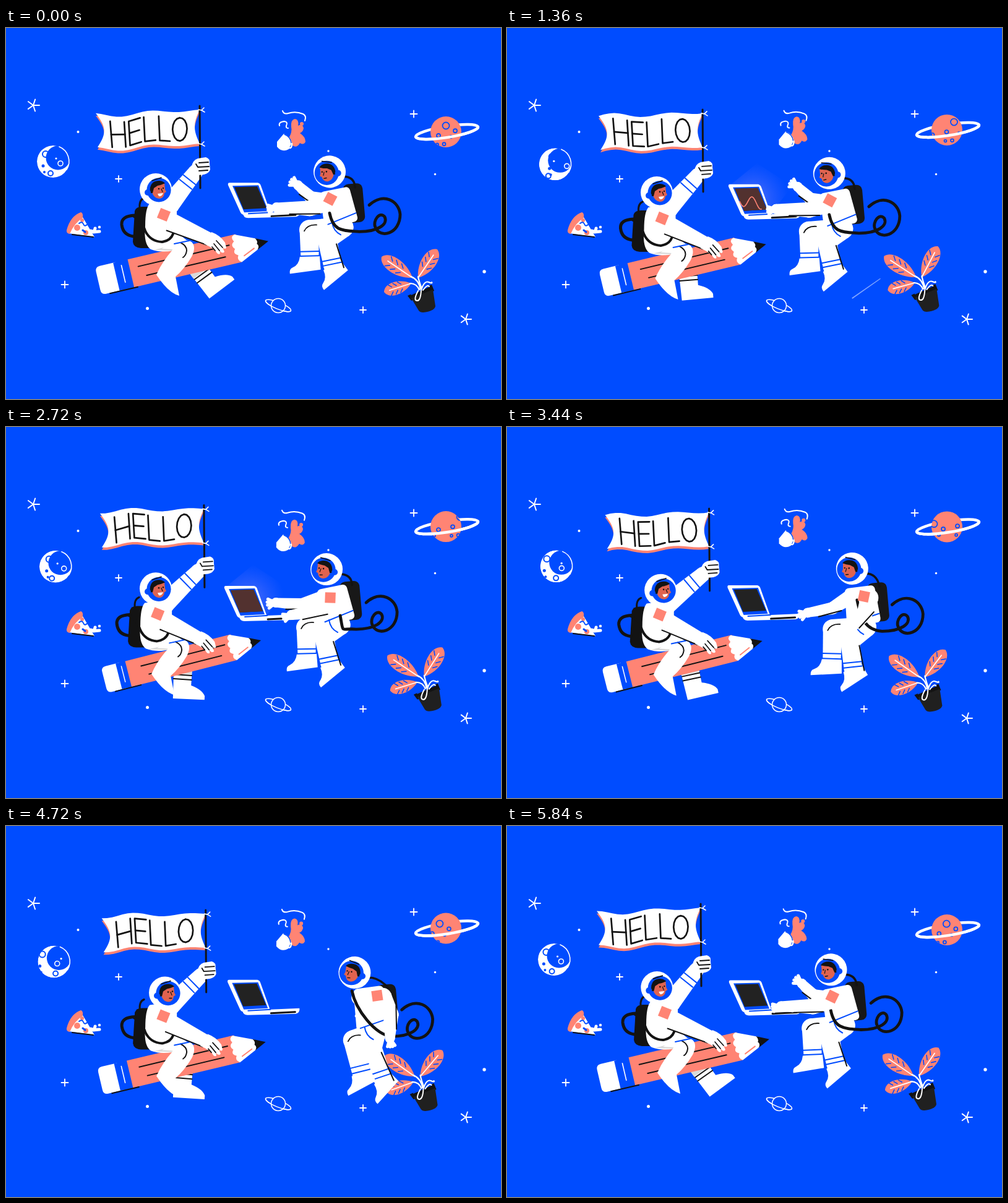
An HTML page that plays this animation: 800x600 px, repeating every 5920 ms.

```html
<!DOCTYPE html>
<html lang="en">
<head>
<meta charset="utf-8">
<title>Hello from space</title>
<style>
html, body { margin: 0; width: 100%; height: 100%; overflow: hidden; background: #004cff; }
svg { display: block; width: 100vw; height: 100vh; }
</style>
</head>
<body>
<svg viewBox="0 0 800 600">
  <defs>
    <radialGradient id="glow" gradientUnits="userSpaceOnUse" cx="398" cy="272" r="58">
      <stop offset="0" stop-color="#b79cf0" stop-opacity=".45"/>
      <stop offset="1" stop-color="#7f7cff" stop-opacity="0"/>
    </radialGradient>
    <clipPath id="globe"><circle r="25"/></clipPath>
    <clipPath id="lunar"><circle r="26"/></clipPath>
  </defs>
  <g id="scene"></g>
</svg>
<script>
const BLUE = '#004cff', CORAL = '#ff8474', SKIN = '#e0634f', INK = '#131313', WHITE = '#fff', GREY = '#d9d9d9';
const LOOP = 5920, STEP = 80, TAU = Math.PI * 2;
let now = 0;

// Timing rules: every part floats on whole cycles of the loop
const cos = (cycles, lag = 0) => Math.cos(TAU * cycles * (now / LOOP - lag));
const sin = cycles => Math.sin(TAU * cycles * now / LOOP);
const ease = (a, b) => {
  const k = Math.min(1, Math.max(0, (now - a) / (b - a)));
  return k * k * (3 - 2 * k);
};
const sway = () => (1 - cos(1)) / 2;
const bob = () => (1 - cos(2)) / 2;
const hover = () => 2 + 5 * cos(2, .135);

const add = (p, x, y) => [p[0] + x, p[1] + y];
const mix = (a, b, k) => a.map((v, i) => v + (b[i] - v) * k);
const angle = (a, b) => Math.atan2(b[1] - a[1], b[0] - a[0]);
const degrees = r => r * 360 / TAU;
function normal(a, b) {
  const t = angle(a, b);
  return [-Math.sin(t), Math.cos(t)];
}
const aside = (a, b, k, d) => {
  const [nx, ny] = normal(a, b);
  return add(mix(a, b, k), nx * d, ny * d);
};

const fill = (d, c) => `<path d="${d}" fill="${c}"/>`;
const line = (d, c = INK, w = 2) =>
  `<path d="${d}" fill="none" stroke="${c}" stroke-width="${w}" stroke-linecap="round" stroke-linejoin="round"/>`;
const dot = (x, y, r, c) => `<circle cx="${x}" cy="${y}" r="${r}" fill="${c}"/>`;
const ring = (x, y, r, c, w) => `<circle cx="${x}" cy="${y}" r="${r}" fill="none" stroke="${c}" stroke-width="${w}"/>`;
const group = ([x, y], rot, inner, sx = 1, sy = sx) =>
  `<g transform="translate(${x} ${y}) rotate(${rot}) scale(${sx} ${sy})">${inner}</g>`;
const fade = (k, inner) => `<g opacity="${k}">${inner}</g>`;
const limb = (a, b, wa, wb) =>
  fill(`M${aside(a, b, 0, wa / 2)}L${aside(a, b, 1, wb / 2)}L${aside(a, b, 1, -wb / 2)}L${aside(a, b, 0, -wa / 2)}Z`, WHITE)
  + dot(...a, wa / 2, WHITE) + dot(...b, wb / 2, WHITE);
const bands = (a, b, w, marks) =>
  marks.map(k => line(`M${aside(a, b, k, w / 2)}L${aside(a, b, k, -w / 2)}`, BLUE)).join('');
const patch = (p, rot) => group(p, rot, `<rect x="-8.5" y="-8.5" width="17" height="17" fill="${CORAL}"/>`);

function orbit(p, rx, ry, rot, w, body) {
  const back = `<ellipse rx="${rx}" ry="${ry}" fill="none" stroke="#fff" stroke-width="${w}"/>`;
  return group(p, rot, back) + group(p, 0, body) + group(p, rot, line(`M${-rx} 0A${rx} ${ry} 0 0 0 ${rx} 0`, WHITE, w));
}

function stars() {
  const plus = (x, y, r) => line(`M${x - r} ${y}h${2 * r}M${x} ${y - r}v${2 * r}`, WHITE, 1.8);
  const burst = (x, y, r) => [0, 1, 2, 3, 4].map(i => {
    const a = i * TAU / 5 - 1.25;
    return line(`M${x} ${y}l${r * Math.cos(a)} ${r * Math.sin(a)}`, WHITE);
  }).join('');
  return burst(44, 125, 10) + burst(743, 471, 9)
    + plus(182, 244, 5) + plus(659, 139, 5.5) + plus(95, 415, 5.5) + plus(577, 456, 5)
    + dot(116.5, 168, 2, WHITE) + dot(521, 199, 1.7, WHITE) + dot(693.5, 236.5, 1.7, WHITE)
    + dot(773, 394, 2.7, WHITE) + dot(228.5, 453.5, 2.5, WHITE)
    + orbit([440, 449], 22, 5.5, 22, 1.5, dot(0, 0, 11.5, BLUE) + ring(0, 0, 11.5, WHITE, 1.5));
}

function meteor(start, span, from, to, size, w, alpha) {
  const p = (now - start) / span;
  if (p <= 0 || p >= 1) return '';
  const l = size * Math.min(1, 4 * p, 4 * (1 - p)), t = angle(from, to), tip = mix(from, to, p);
  const tail = add(tip, -l * Math.cos(t), -l * Math.sin(t));
  return fade(alpha, fill(`M${aside(tail, tip, 1, w)}L${aside(tail, tip, 0, .6)}L${aside(tail, tip, 0, -.6)}L${aside(tail, tip, 1, -w)}Z`, WHITE)
    + dot(...tip, w, WHITE));
}

function planet() {
  const holes = [[0, -10, 5.5], [15, 2, 3], [-12, 3, 3], [-3, 19, 2.5], [-14, 17, 2], [8, 10, 2]];
  const craters = holes.map(([x, y, r]) => {
    const cx = (x + 25 + 50 * now / LOOP) % 50 - 25;
    return ring(cx, y - cx * .25, r, BLUE, 1.8);
  }).join('');
  return orbit([712.5, 164.5 + 3.5 * cos(1)], 51, 9, -9, 4.5,
    group([-1.5, 0], 0, dot(0, 0, 25, CORAL) + `<g clip-path="url(#globe)">${craters}</g>`));
}

function moon() {
  const a = 7 * sin(1);
  const body = dot(0, 0, 26, WHITE)
    + ring(-12 + a, -12, 5, BLUE, 2) + dot(-16 + a, 7, 2.5, BLUE) + ring(-4 - a, 19, 4, BLUE, 2) + dot(-14 + a, 17, 2, BLUE)
    + dot(8, -6, 19.5, BLUE) + ring(12 + a, 3, 4, WHITE, 1.6) + dot(5 - a, -5, 1.6, WHITE);
  return group([78 - 2 * cos(1), 221 - 5 * cos(1)], 0,
    `<g clip-path="url(#lunar)">${body}</g>` + line('M10 -24A25.5 25.5 0 0 1 22 13', WHITE, 1.6));
}

function pizza() {
  return fill('M121 301L143 338L101 332Z', WHITE)
    + fill('M121 298Q104 304 98 327Q97 332 103 333Q110 316 124 307Q125 299 121 298Z', CORAL)
    + dot(115, 323, 5, CORAL) + dot(129, 331, 4, CORAL) + dot(123, 311, 3, CORAL)
    + line('M118 316q5 -4 7 1t6 1', BLUE) + line('M124 327l4 3', BLUE, 3)
    + line('M107 334L141 338')
    + line('M137 328Q143 331 144 324M141 330L151 329', WHITE, 5) + dot(151, 322, 2.2, WHITE);
}

function mug() {
  const splash = fill('M457 178Q463 168 461 160Q460 148 467 147Q474 148 472 158Q479 154 481 162Q480 168 475 170Q484 176 484 184Q481 190 475 186Q470 195 463 190Z', CORAL)
    + dot(478, 155, 3, CORAL);
  const cup = fill('M438 184L449 171Q460 175 462 185L457 196Q446 202 438 192Z', WHITE)
    + line('M450 172Q460 176 461 186', BLUE, 1.5) + line('M454 192Q462 198 462 187', WHITE, 2.5);
  const steam = line('M447 134Q449 140 456 138Q468 134 480 139Q486 142 483 150M442 158Q440 152 450 151Q456 152 453 158Q452 162 456 162', WHITE);
  return group([2 * sin(2), -1.5 * sin(2)], 0, steam) + group([0, 0], .5 * sin(3), splash + cup);
}

function leaf(tip, base, w) {
  const edge = s => [aside(base, tip, .35, s * w), aside(base, tip, .9, s * w)];
  const [a, b] = edge(1), [c, d] = edge(-1);
  const veins = [.35, .52, .69].flatMap(k => [-1, 1].map(s =>
    line(`M${aside(base, tip, k, s * 4)}L${aside(base, tip, k + .1, s * 9)}`, BLUE, 1.6))).join('');
  return fill(`M${base}C${a} ${b} ${tip}C${d} ${c} ${base}Z`, CORAL) + veins + line(`M${base}L${mix(base, tip, .8)}`, WHITE, 1.7);
}
function plant() {
  const s = sin(1);
  const stems = line('M655 402Q668 408 670 424M666 402Q668 412 673 424M653 413Q664 413 668 424', WHITE, 2.2);
  const pot = fill('M649 433L688 415L692 425L655 441Z', INK)
    + fill('M655 437L690 423L694 450Q692 458 674 460Q669 460 667 457Z', '#202020')
    + line('M655 431L684 418', BLUE, 1.6)
    + line('M666 425Q658 440 664 441T671 424Q676 408 683 411T688 411M674 424Q681 414 684 418', WHITE);
  return group([10 * sway(), -s], 0, leaf([607 - 2 * s, 370], [657, 404], 16)
    + leaf([697 - 5 * s, 358 - 4 * s], [666, 404], 16) + leaf([611, 427 - 2 * s], [655, 413], 14) + stems + pot);
}

function helmet(p, rot, flip, smile) {
  const parts = dot(0, 0, 26, WHITE) + dot(5, 1, 19.6, BLUE)
    + fill('M-5 -4L2 -8L14 -10L15 0L17 4L14 6Q13 15 5 15Q-3 14 -6 5Z', SKIN)
    + fill('M-9 6Q-11 -9 -1 -13Q9 -16 15 -10Q9 -7 3 -6L-3 -2L-5 6Z', INK)
    + dot(5, -1, 1.3, INK) + dot(12, -2, 1.2, INK) + line('M9 -1L11 4', INK, 1.2)
    + (smile ? fill('M3 7L12 6Q10 12 5 11Z', WHITE) : line('M7 9L11 9', INK, 1.4))
    + line('M-6 -14L9 -19', INK, 1.6) + dot(-13, 5, 5, BLUE);
  return group(p, rot, parts, flip, 1);
}

const LETTERS = [
  [[.136, .16], [.145, .92]], [[.272, .16], [.278, .9]], [[.14, .55], [.275, .53]],
  [[.425, .16], [.315, .17], [.32, .88], [.43, .87]], [[.318, .52], [.415, .51]],
  [[.46, .16], [.465, .88], [.57, .87]], [[.605, .16], [.61, .87], [.71, .86]],
  Array.from({ length: 17 }, (_, i) => [.807 + .07 * Math.sin(i * TAU / 16), .51 - .34 * Math.cos(i * TAU / 16)])
];
function flag([x, y]) {
  const drop = 6 + 4 * cos(3), phase = 3 * TAU * now / LOOP - 1.18;
  const spot = ([u, v]) => {
    const notch = u === 0 ? 12 : u === 1 ? -8 : 0;
    return [
      x - 1 - 168 * (1 - u) + notch * Math.sin(Math.PI * v) + 3 * v * (1 - u),
      y - 91 + drop * (1 - u) + 55 * v + 4.5 * Math.sin(TAU * 1.75 * u + phase) * Math.sqrt(1 - u)
    ];
  };
  const trace = pts => 'M' + pts.map(spot).join('L');
  const run = f => Array.from({ length: 21 }, (_, i) => f(i / 20));
  const cloth = trace([...run(k => [k, 0]), ...run(k => [1, k]), ...run(k => [1 - k, 1]), ...run(k => [0, 1 - k])]) + 'Z';
  return group([0, 4], 0, fill(cloth, CORAL)) + fill(cloth, WHITE)
    + `<g role="img" aria-label="HELLO">${LETTERS.map(l => line(trace(l), INK, 2.7)).join('')}</g>`
    + line(`M${x - 1} ${y - 97}L${x} ${y + 36}`, INK, 3)
    + [-91, -36].map(h => line(`M${x - 3} ${y + h}l5 1l4 -4m-4 4l5 3`, WHITE, 1.6)).join('');
}

function pencil() {
  const k = sway(), end = [149 + 10 * k, 409 + 4 * bob()], tip = [423 - 12 * k, 345 + 5 * bob()];
  const rubber = 30 - 4 * k, wood = 54 - 11 * k, mid = (rubber + wood) / 2;
  const body = fill(`M34 -23H8Q0 -23 0 -15V15Q0 23 8 23H34Z`, WHITE)
    + fill(`M${rubber} -23H${wood + 2}V23H${rubber}Z`, BLUE) + line(`M${mid} -16V12`, WHITE, 1.6)
    + fill(`M${wood} -23H232L240 0L232 23H${wood}Z`, CORAL)
    + fill('M230 -23L264 -8V8L232 23Q224 18 229 11Q220 7 226 0Q219 -7 227 -12Q222 -20 230 -23Z', WHITE)
    + fill('M261 -9.5L281 0L261 9.5Q266 4 262 0Q265 -4 261 -9.5Z', INK)
    + line('M238 14L256 6', CORAL) + line('M68 -8H122M142 -8H218M78 9H208') + line('M14 24H60');
  return group(end, degrees(angle(end, tip)), body, Math.hypot(tip[0] - end[0], tip[1] - end[1]) / 280);
}

function rider() {
  const k = sway(), b = bob();
  const watch = ease(3000, 4000) * (1 - ease(5200, 5900)), lift = ease(2720, 4160) * (1 - ease(4160, 5300));
  const o = [-8 * k + 3 * watch, 6 * b];
  const fist = [314 + 7 * k + 14 * lift, 223 + 6 * b + 9 * lift];
  const shoulder = add(o, 264, 286), cuff = mix(shoulder, fist, .85);
  const near = add(o, 248, 306), wrist = [328 - 17 * k, 341 + 7 * b];

  const pack = group(o, 0, fill('M208 296Q210 289 220 289H238V356H218Q206 355 205 346Z', INK)
    + line('M208 303Q186 304 187 318Q189 335 206 337', INK, 5) + line('M216 291Q215 278 223 275', INK, 3));
  const farLeg = group([297 + 11 * cos(3) - 3 * k, 387], -13 - 23 * cos(3),
    fill('M-15 -6H15V30Q34 36 38 46V52L-13 53Z', WHITE) + fill('M-15 -6H15V12H-15Z', GREY) + line('M-14 14H15M-14 21H15'));
  const raised = limb(shoulder, cuff, 32, 24) + bands(shoulder, cuff, 25, [.62, .76]);
  const grip = group(fist, 0, fill('M-14 2Q-13 -9 -4 -12L9 -14Q16 -12 15 -4L16 6Q14 12 6 14L-4 15Q-12 12 -14 2Z', WHITE)
    + line('M-2 -5L13 -6M-4 2L14 1M-2 8L12 7M-7 -3L-4 2', INK, 1.9));
  const body = group(o, 0, fill('M232 284Q225 292 225 320Q222 350 234 358Q256 366 285 356L300 350L276 330L276 292Q255 280 232 284Z', WHITE)
    + fill('M238 359Q262 354 276 347L268 360Z', GREY)
    + fill('M252 357Q282 336 300 346Q308 354 300 370Q288 390 274 402L280 433Q262 428 243 399Q252 378 270 358Z', WHITE)
    + line('M282 347Q292 352 292 360Q291 368 286 371') + line('M272 349L296 344', BLUE)
    + line('M207 305Q218 308 225 328Q233 345 252 346Q266 344 270 333', INK, 4));
  const reach = limb(near, wrist, 34, 21) + line(`M${aside(near, wrist, .22, 15)}L${aside(near, wrist, 1, 10.5)}`)
    + group(wrist, 0, fill('M-8 8L4 -11Q18 -6 26 6L28 14Q27 18 22 14L25 21Q22 25 17 19L18 24Q14 27 10 18L0 12Z', WHITE)
      + line('M12 3L22 14M8 8L17 19M5 13L10 19', INK, 1.7));
  return pack + farLeg + raised + flag(fist) + grip + pencil() + body
    + helmet([242 + 15 * watch, 261 + 5 * b + 4 * watch], 0, 1, watch < .5)
    + reach + patch(add(o, 255 - 2 * k, 302), 22);
}

function laptop() {
  const on = ease(320, 640) * (1 - ease(2880, 3200)), signal = ease(480, 640) * (1 - ease(2400, 2560));
  const sink = ease(2000, 2700) * (1 - ease(2900, 3600));
  const screen = 'M369 256L406 255L421 290L384 292Z';
  const wave = Array.from({ length: 17 }, (_, i) => [377 + i * 2.2, 275 + i * .35 + 9 * Math.sin(i * .5 + now / 210)]);
  return group([-2 * sway() - 4 * sink, hover() + 9 * sink], 0,
    fade(on, fill('M362 250L405 215L462 252L427 297Z', 'url(#glow)'))
    + fill('M361 249L407 249Q411 250 412 254L427 296L386 301Q381 301 379 297L359 253Q358 249 361 249Z', WHITE)
    + fill('M366 254L408 253L424 295L385 297Z', BLUE) + fill(screen, '#222')
    + fade(on, fill(screen, '#52312f')) + fade(signal, line('M' + wave.join('L'), CORAL, 1.6))
    + fill('M383 299L475 295Q476 302 469 304L391 306Q384 306 383 299Z', WHITE)
    + line('M392 299L428 297', BLUE) + line('M429 303L468 301', INK, 3));
}

// Key poses of the floating worker
const TYPE = {
  neck: [532, 266], hip: [541, 310], head: [523, 231], shoulder: [533, 277], hand: [437, 289], hand2: [472, 253],
  knee: [490, 325], ankle: [491, 371], knee2: [519, 340], ankle2: [528, 384], hose: [523, 298], spin: [28]
};
const BOTH = { ...TYPE, shoulder: [538, 279], hand: [466, 305], hand2: [441, 285], hose: [545, 306], spin: [2] };
const AWAY = {
  neck: [618, 252], hip: [621, 303], head: [602, 215], shoulder: [643, 261], hand: [648, 338], hand2: [540, 304],
  knee: [572, 317], ankle: [568, 375], knee2: [599, 339], ankle2: [600, 388], hose: [596, 242], spin: [22]
};
const BACK = {
  neck: [564, 280], hip: [575, 338], head: [536, 255], shoulder: [585, 289], hand: [602, 348], hand2: [606, 291],
  knee: [555, 370], ankle: [583, 423], knee2: [589, 374], ankle2: [619, 427], hose: [533, 287], spin: [-32]
};
const ACTS = [[0, TYPE], [1900, TYPE], [2720, BOTH], [4160, AWAY], [5200, BACK], [LOOP, TYPE]];
function pose() {
  const i = ACTS.findIndex(([t]) => t > now), [t0, a] = ACTS[i - 1], [t1, b] = ACTS[i], k = ease(t0, t1);
  return Object.fromEntries(Object.keys(a).map(j => [j, mix(a[j], b[j], k)]));
}

function arm(from, hand, bend, wide, thin, spread) {
  const elbow = aside(from, hand, .45, -bend), a = angle(elbow, hand) - .2;
  const fingers = [-1, -.3, .35, 1].map(k =>
    line(`M${hand}l${14 * Math.cos(a + k * spread)} ${14 * Math.sin(a + k * spread)}`, WHITE, 5)).join('');
  return limb(from, elbow, wide, wide - 4) + limb(elbow, hand, wide - 4, thin) + dot(...hand, 8, WHITE) + fingers
    + line(`M${aside(from, elbow, .7, 1 - wide / 2)}L${aside(elbow, hand, .6, -thin / 2 - 2)}`);
}
function leg(hip, knee, ankle, gain, twist) {
  const tilt = degrees(angle(knee, ankle)) - 90;
  return limb(hip, knee, 33, 32) + limb(knee, ankle, 31, 29)
    + group(ankle, tilt * gain + twist, fill('M-16 -3H16L17 19L-33 24Q-34 16 -28 14Q-18 10 -16 -3Z', WHITE))
    + bands(knee, ankle, 30, [.76, .92]);
}
function floater() {
  const p = pose(), seat = add(p.hip, 4, 11), loop = add(p.hip, 65, -4), spin = p.spin[0];
  const side = (k, d) => aside(p.neck, p.hip, k, d);
  const chest = side(0, 18), back = side(0, -18), belly = side(1, 21), rump = side(1, -21);
  const pack = add(mix(back, rump, .3), 9, 6);
  const bag = group(pack, -5, '<rect x="-16" y="-31" width="32" height="63" rx="9" fill="#181818"/>')
    + line(`M${add(p.head, 22, 8)}Q${add(p.head, 40, 8)} ${add(pack, 2, -25)}`, INK, 3.5);
  const torso = `<path d="M${chest}L${belly}L${rump}L${back}Z" fill="#fff" stroke="#fff" stroke-width="13" stroke-linejoin="round"/>`;
  const at = (x, y) => add(loop, x, y);
  const hose = line(`M${p.hose}C${add(p.hose, 6, 30)} ${at(-62, 20)} ${at(-35, 22)}C${at(-5, 22)} ${at(12, 10)} ${at(6, -2)}`
    + `C${at(-2, -12)} ${at(-14, 5)} ${at(-9, 15)}C${at(-2, 34)} ${at(31, 26)} ${at(31, -6)}C${at(29, -28)} ${at(4, -42)} ${at(-19, -21)}`, INK, 4.8);
  return group([-5 * sway(), hover()], 0,
    arm(add(chest, 2, 8), p.hand2, 7, 24, 15, .55) + bag
    + leg(seat, p.knee2, p.ankle2, 1.2, -20) + line(`M${add(p.knee2, 15, 8)}L${add(p.ankle2, 18, 2)}`)
    + torso + leg(seat, p.knee, p.ankle, 1.6, 0)
    + line(`M${add(belly, 0, 2)}L${add(rump, 4, -8)}`, BLUE)
    + line(`M${add(seat, -18, -8)}Q${add(seat, -16, 6)} ${add(seat, -4, 12)}`, BLUE)
    + line(`M${add(p.knee, -8, 2)}Q${add(p.knee, -3, -9)} ${add(p.knee, 12, -8)}`, INK, 1.8)
    + hose + helmet(p.head, -spin * .4, -1, false)
    + arm(p.shoulder, p.hand, 8, 29, 16, .45) + patch(add(p.shoulder, -9, -2), spin));
}

const scene = document.getElementById('scene');
let shown = -1;
function draw(ms) {
  const step = Math.floor(ms % LOOP / STEP);
  if (step === shown) return;
  shown = step;
  now = step * STEP;
  scene.innerHTML = stars()
    + meteor(400, 480, [790, 237], [470, 461], 120, 2, .9)
    + meteor(720, 920, [765, 292], [468, 500], 55, 1, .5)
    + meteor(3890, 400, [330, 175], [60, 363], 42, 1, .9)
    + planet() + moon() + pizza() + mug() + plant() + rider() + laptop() + floater();
}
const begin = performance.now();
function tick() {
  draw(performance.now() - begin);
  requestAnimationFrame(tick);
}
tick();
</script>
</body>
</html>
```
